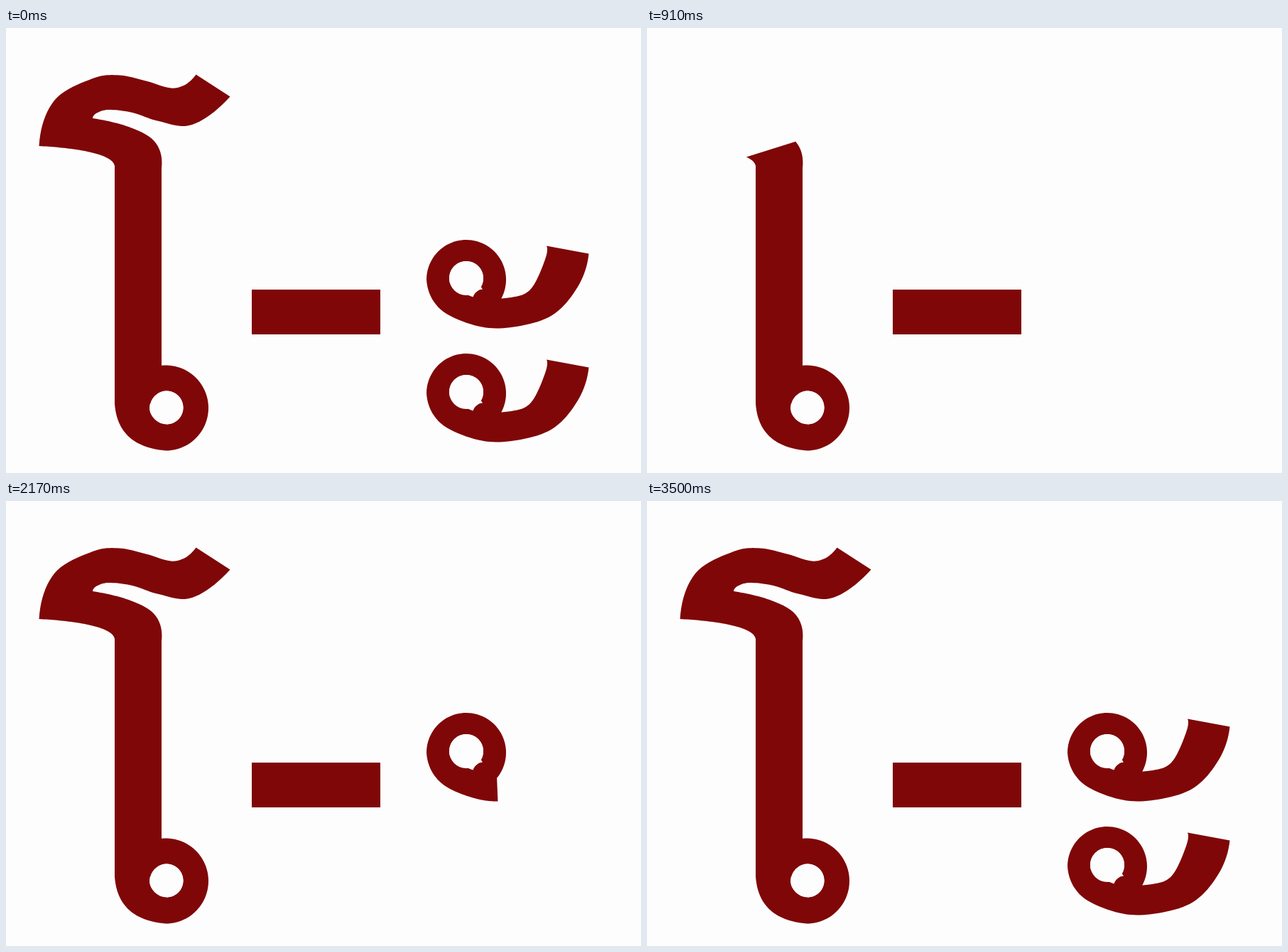
These frames come from a looping animation (894 px wide and 626 px high, 4.2 s). An HTML page with a canvas:

```html
<!DOCTYPE html>
<html lang="th">
<head>
<meta charset="utf-8">
<title>Vowel stroke order</title>
<style>
html, body { margin: 0; width: 100%; height: 100%; overflow: hidden; background: #fefdfe; }
canvas { display: block; }
</style>
</head>
<body>
<canvas id="stage" width="894" height="626"></canvas>
<script>
const ctx = document.getElementById('stage').getContext('2d');
const INK = '#7f0707', PAPER = '#fefdfe';
const STEP = 70, LOOP = 4200, LAST_STEP = 50, SAMPLES = 60;

// A stroke is a ribbon. Its parts map 0..1 to a cut across it: [outerX, outerY, innerX, innerY].
const onCircle = ([x, y, r], degrees) => {
  const a = degrees * Math.PI / 180;
  return [x + r * Math.cos(a), y + r * Math.sin(a)];
};

// Band between two circles; the inner edge may run ahead by "lead" degrees.
const ring = (rim, eye, from, to, lead = 0) => u => {
  const angle = from + (to - from) * u;
  return [...onCircle(rim, angle), ...onCircle(eye, angle + lead)];
};

// Smooth ribbon through evenly timed cuts, with relaxed ends.
const through = (...cuts) => {
  const last = cuts.length - 1;
  const slope = (i, k) => {
    if (last === 1) return cuts[1][k] - cuts[0][k];
    if (i === 0) return 2 * (cuts[1][k] - cuts[0][k]) - slope(1, k);
    if (i === last) return 2 * (cuts[i][k] - cuts[i - 1][k]) - slope(i - 1, k);
    return (cuts[i + 1][k] - cuts[i - 1][k]) / 2;
  };
  return u => {
    const i = Math.min(last - 1, Math.floor(u * last));
    const t = u * last - i, s = 1 - t;
    return cuts[i].map((p, k) =>
      s * s * (1 + 2 * t) * p + t * t * (1 + 2 * s) * cuts[i + 1][k]
      + s * t * (s * slope(i, k) - t * slope(i + 1, k)));
  };
};

function makeTallVowel() {
  const eye = [226, 534, 23.5];
  const left = 153, right = 219, foot = 528, neck = 197;
  const neckCut = [left, neck, right, neck], beak = [46.5, 166, 122, 127];
  return {
    eye,
    cap: [205, 498, 17.5],
    parts: [
      { until: 4.1, cutAt: ring([225, 534.5, 60], eye, -120, 90) },
      { until: 5.85, cutAt: through([225, 594.5, 226, 557], [173, 575, 206, 546], [left, foot, 203, foot]) },
      { until: 11.3, cutAt: through([left, foot, right, foot], neckCut) },
      { until: 16, cutAt: through(neckCut, [142, 182.5, 211, 162], [105, 172, 178, 141], beak) },
      { until: 22, cutAt: through(beak, [68, 102, 128, 119.5], [122, 71, 145, 115], [160, 66.5, 178, 119],
        [197, 74.5, 215, 131], [238, 84.5, 262, 136], [267.5, 65.5, 315.5, 96.5]) }
    ]
  };
}

function makeHook() {
  const eye = [648, 352, 24];
  return {
    eye,
    cap: [672, 382.5, 15],
    parts: [
      { until: 5.3, cutAt: ring([648, 354, 56], eye, 46, -180, -16) },
      { until: 14, cutAt: through([592, 354, 625, 359], [612, 396, 640, 370], [665, 419.5, 665, 380],
        [715, 420.5, 711.5, 379], [769, 404, 739, 367], [805, 364, 758.5, 327], [820.5, 317.5, 761, 306.5]) }
    ]
  };
}

function disc([x, y, r], color) {
  ctx.fillStyle = color;
  ctx.beginPath();
  ctx.arc(x, y, r, 0, 2 * Math.PI);
  ctx.fill();
}

function drawStroke({ eye, cap, parts }, progress, dy = 0) {
  if (progress <= 0) return;
  const outer = [], inner = [];
  let start = 0;
  for (const { until, cutAt } of parts) {
    if (progress <= start) break;
    const end = Math.min(1, (progress - start) / (until - start));
    for (let i = 0; i <= SAMPLES; i++) {
      const [ox, oy, ix, iy] = cutAt(end * i / SAMPLES);
      outer.push([ox, oy]);
      inner.push([ix, iy]);
    }
    start = until;
  }
  ctx.save();
  ctx.translate(0, dy);
  ctx.beginPath();
  for (const [x, y] of outer.concat(inner.reverse())) ctx.lineTo(x, y);
  ctx.fillStyle = INK;
  ctx.fill();
  disc(cap, INK);
  disc(eye, PAPER);
  ctx.restore();
}

const tallVowel = makeTallVowel(), hook = makeHook();

function draw(time) {
  const step = Math.floor(time % LOOP / STEP) || LAST_STEP;
  ctx.fillStyle = PAPER;
  ctx.fillRect(0, 0, 894, 626);
  ctx.fillStyle = INK;
  ctx.fillRect(346, 368, 181, 63);
  drawStroke(tallVowel, step);
  drawStroke(hook, step - 22);
  drawStroke(hook, step - 36, 160);
}

let origin;
function tick(now) {
  origin ??= now;
  draw(now - origin);
  requestAnimationFrame(tick);
}
draw(0);
requestAnimationFrame(tick);
</script>
</body>
</html>
```
